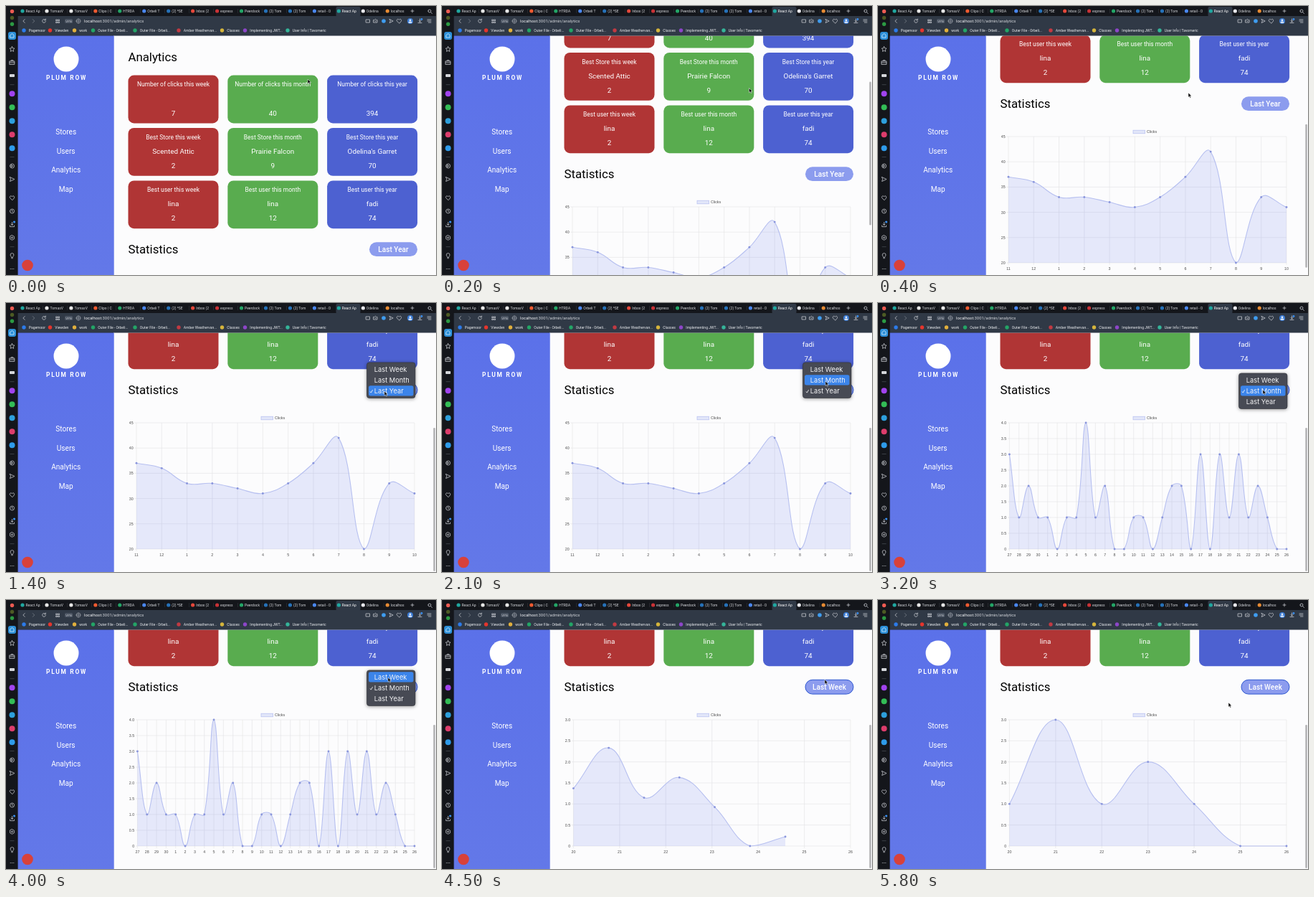
Recreate the animation shown at these times as an HTML page. Size 600 by 375 pixels, loop 5900 ms.

```html
<!DOCTYPE html>
<html lang="en">
<head>
<meta charset="utf-8">
<title>Analytics dashboard</title>
<style>
  html, body { margin: 0; width: 100%; height: 100%; overflow: hidden; background: #14161b; }
  #stage { display: block; width: 600px; height: 375px; font-family: Roboto, sans-serif; }
  text { white-space: pre; }
  .tick { font: 5.3px "Liberation Sans", sans-serif; fill: #4c4c4c; }
  .menu { font: 9.3px Inter, sans-serif; fill: #f4f4f6; }
  .icon { fill: none; stroke: #c3c6cc; stroke-width: .8; stroke-linecap: round; stroke-linejoin: round; }
  #popup { filter: drop-shadow(0 1px 2.5px rgba(0, 0, 0, .4)); }
</style>
</head>
<body>
<svg id="stage" viewBox="0 0 600 375">
  <defs>
    <linearGradient id="side" x2="0" y2="1">
      <stop stop-color="#5b71e9"/><stop offset="1" stop-color="#6378e8"/>
    </linearGradient>
    <clipPath id="page"><rect x="150" y="41.5" width="450" height="333.5"/></clipPath>
    <clipPath id="plot"><rect x="181" y="384" width="390" height="178"/></clipPath>
  </defs>
  <rect x="150" y="41" width="450" height="334" fill="#fcfcfd"/>
  <g clip-path="url(#page)">
    <g id="content">
      <g id="cards"></g>
      <g id="button">
        <rect id="pill" x="507" y="329.3" width="67" height="19.8" rx="9.9" fill="#8c9cee"/>
        <text id="choice" x="540.5" y="342.9" font-size="10.1" font-weight="500" fill="#fff" text-anchor="middle"></text>
      </g>
      <rect x="356" y="376.2" width="16.5" height="4.6" fill="#e2e6f9" stroke="#b4bdf0" stroke-width=".7"/>
      <text class="tick" x="375" y="380.4">Clicks</text>
      <g id="axes"></g>
      <g clip-path="url(#plot)">
        <path id="area" fill="#6075e8" fill-opacity=".15"/>
        <path id="line" fill="none" stroke="#b7c0f0" stroke-width="1.1"/>
      </g>
      <g id="dots" fill="#8995dc"></g>
    </g>
    <rect id="thumb" x="596.2" width="2.8" height="200" rx="1.4" fill="#b8b8ba"/>
  </g>
  <g id="chrome"></g>
  <g id="popup">
    <rect x="503.5" y="0" width="67.5" height="49.6" rx="3.5" fill="#474a54" stroke="#303136" stroke-width=".6"/>
    <rect id="hover" x="506" width="62.5" height="14.4" rx="2.5" fill="#3b84ea"/>
    <g id="options"></g>
    <path id="check" fill="none" stroke="#fff" stroke-width=".8" d="M508 .5l1.3 1.7 2.3-4"/>
  </g>
  <g id="cursor" stroke-width=".5">
    <path id="arrow" d="M0 0v6.2l1.5-1.3 1 2.3 1.1-.5-1-2.2h2z" fill="#000" stroke="#fff"/>
    <path id="hand" d="M-.7 3.6v-3a.7.7 0 0 1 1.4 0v2l2.6.6q.8.3.7 1.2l-.5 2.6h-3.4l-2.2-2.6q.2-1 1.4-.2z" fill="#fff" stroke="#000"/>
  </g>
</svg>
<script>
const $ = id => document.getElementById(id);

function add(parent, tag, attrs, content) {
  const el = document.createElementNS('http://www.w3.org/2000/svg', tag);
  for (const key in attrs) el.setAttribute(key, attrs[key]);
  if (content !== undefined) el.textContent = content;
  parent.appendChild(el);
  return el;
}

const rect = (p, x, y, width, height, fill, rx = 0) => add(p, 'rect', { x, y, width, height, fill, rx });
const dot = (p, cx, cy, r, fill) => add(p, 'circle', { cx, cy, r, fill });
const label = (p, x, y, size, fill, str, anchor = 'start') =>
  add(p, 'text', { x, y, 'font-size': size, fill, 'text-anchor': anchor }, str);
const icon = (p, x, y, d) => add(p, 'path', { class: 'icon', transform: `translate(${x} ${y})`, d });
const show = (id, on) => { $(id).style.display = on ? '' : 'none'; };

// ---- browser window ----
const RING = 'M-3 0a3 3 0 1 0 6 0a3 3 0 1 0-6 0';
const HEART = 'M0 3l-3-3c-1-2 1.5-4 3-1.6c1.5-2.4 4-.4 3 1.6z';

function drawTabs(g) {
  const tabs = [
    ['React Ap', '#20a7a0'], ['TomasV', '#e6e6e6'], ['TomasV', '#e6e6e6'], ['Clipo | C', '#ee5a30'],
    ['HTRDA', '#23a566'], ['Orbeli T', '#4a87ee'], ['(2) *SE', '#2671b8'], ['Inbox (2', '#e5483b'],
    ['express', '#c93236'], ['Peerdock', '#23a566'], ['(2) Tom', '#2671b8'], ['(2) Tom', '#2671b8'],
    ['retail - O', '#4a87ee'], ['React Ap', '#20a7a0'], ['Odelina', '#e8e8ec'], ['localhos', '#e78b33'],
  ];
  rect(g, 460.5, 1, 34, 14, '#303946', 2);
  tabs.forEach(([name, color], i) => {
    const x = 20 + i * 33.95;
    dot(g, x + 3, 7, 2.6, color);
    label(g, x + 7.5, 9, 5, i === 13 ? '#fff' : '#d6d8dc', name);
    if (i && i !== 13 && i !== 14) rect(g, x - 2.4, 4, .4, 6, '#41454d');
  });
  icon(g, 567, 7, 'M-2 0h4M0-2v4');
  icon(g, 591, 7, 'M-2 0a2 2 0 1 0 4 0a2 2 0 1 0-4 0M1.5 1.5l2 2');
}

function drawToolbar(g) {
  icon(g, 25, 21, 'M1.2-2.4l-2.4 2.4 2.4 2.4');
  icon(g, 38.5, 21, 'M-1.2-2.4l2.4 2.4-2.4 2.4').style.opacity = .5;
  icon(g, 53, 21, 'M2 -1.5a2.4 2.4 0 1 0 .4 2M2.3 -3v1.8h-1.8');
  icon(g, 72, 21, 'M-2-2h1.5v1.5h-1.5zM1-2h1.5v1.5h-1.5zM-2 1h1.5v1.5h-1.5zM1 1h1.5v1.5h-1.5z');
  rect(g, 82, 18, 11, 6, '#4b5462', 1.5);
  label(g, 87.5, 22.7, 4.2, '#c3c6cc', 'VPN', 'middle');
  icon(g, 101, 21, RING + 'M-3 0h6M0-3v6').style.strokeWidth = .5;
  const url = label(g, 109, 23, 5.9, '#f2f3f5', 'localhost');
  add(url, 'tspan', { fill: '#d2d5da' }, ':3001/admin/analytics');
  icon(g, 505, 21, 'M-2.5-2h5v4h-5z');
  icon(g, 515.5, 21, 'M-2.5-1.5h1l1-1h1l1 1h1v3.5h-5zM-.8 0h1.6');
  dot(g, 527, 21, 2.8, '#3f9df0');
  icon(g, 537.5, 21, 'M-2.3-2.5l5 2.5-5 2.5 1-2.5z');
  icon(g, 548.5, 21, HEART);
  dot(g, 564, 21, 4, '#3a7bd5');
  dot(g, 564, 20, 1.4, '#e4ecf6');
  rect(g, 561.5, 21.8, 5, 2, '#e4ecf6', 1);
  icon(g, 577.5, 21, 'M0-3v4m-1.6-1.5l1.6 1.6 1.6-1.6M-2.5 2.5h5');
  dot(g, 580, 18.5, 1.4, '#3c91f2');
  icon(g, 590.5, 21, 'M-2.5-2h5M-2.5 0h5M-1 2h3.5');
}

function drawBookmarks(g) {
  const marks = [
    [25, '#2c7bea', 'Pagemoor'], [61.5, '#e5352d', 'Viewden'], [95.5, '#e1b03c', 'work'],
    [121.5, '#23a566', 'Outer File - Orbeli...'], [180, '#23a566', 'Outer File - Orbeli...'],
    [241, '#c23a42', 'Amber Weathervan...'], [301.5, '#d6b53b', 'Classes'],
    [333.5, '#8d46c9', 'Implementing JWT...'], [393, '#35b59a', 'User Info | Tavomeric'],
  ];
  for (const [x, color, name] of marks) {
    dot(g, x, 34, 2.7, color);
    label(g, x + 6.8, 35.9, 5, '#eceef1', name);
  }
}

function drawRail(g) {
  dot(g, 8.5, 7.5, 2.7, '#ee5b52');
  dot(g, 8.5, 16.5, 2.7, '#4c5a24');
  dot(g, 8.5, 25.2, 2.7, '#2c9a43');
  rect(g, 3, 36, 11, 11, '#2c8fd8', 3);
  icon(g, 8.5, 41.5, 'M-2.5-1l2.5-2 2.5 2v3.5h-5z').style.stroke = '#d7efff';
  icon(g, 8.5, 60, 'M0-3.4l1 2.2 2.5.3-1.8 1.8.4 2.5-2.1-1.2-2.1 1.2.4-2.5-1.8-1.8 2.5-.3z');
  icon(g, 8.5, 78.5, 'M-3.3-1.6h6.6v4.6h-6.6zM-1.3-1.6v-1.4h2.6v1.4M-3.3.5h6.6');
  rect(g, 5, 95, 7, 4, '#d4d6da', 1);
  rect(g, 5.5, 109.5, 6, .6, '#555a63');
  ['#a143ef', '#33bd56', '#2d9fdc', '#dd3d6c', '#2e9bea'].forEach((c, i) => dot(g, 8.5, 122.3 + i * 19, 4, c));
  rect(g, 5.5, 210, 6, .6, '#555a63');
  icon(g, 8.5, 223, RING + 'M-1-1.4l2.3 1.4-2.3 1.4z');
  icon(g, 8.5, 241.5, 'M-3-3l6.4 3-6.4 3 1-3z');
  icon(g, 8.5, 267.5, HEART);
  icon(g, 8.5, 286, RING + 'M0-1.6v1.8l1 .8');
  icon(g, 8.5, 304.5, 'M0-3v4m-1.6-1.5l1.6 1.6 1.6-1.6M-3 1.5v1.7h6v-1.7');
  dot(g, 11.5, 301, 1.6, '#3c91f2');
  icon(g, 8.5, 323, 'M0-3.3l2.9 1.6v3.4l-2.9 1.6-2.9-1.6v-3.4zM-1 0a1 1 0 1 0 2 0a1 1 0 1 0-2 0');
  rect(g, 5.5, 335.5, 6, .6, '#555a63');
  icon(g, 8.5, 348.5, 'M-1 1.5c0-1-1.4-1.3-1.4-3a2.4 2.4 0 0 1 4.8 0c0 1.7-1.4 2-1.4 3zM-.8 3.2h1.6');
  [-2.2, 0, 2.2].forEach(dx => dot(g, 8.5 + dx, 366.5, .6, '#c3c6cc'));
}

function drawChrome() {
  const g = $('chrome');
  rect(g, 0, 0, 600, 14.5, '#14161b');
  rect(g, 0, 0, 16.6, 375, '#14161b');
  rect(g, 16.6, 14, 583.4, 27.5, '#303946');
  rect(g, 16.6, 41.5, 134.1, 333.5, 'url(#side)');
  drawTabs(g);
  drawToolbar(g);
  drawBookmarks(g);
  drawRail(g);
  dot(g, 84, 74, 17.5, '#fff');
  add(g, 'text', { x: 84.5, y: 103, 'font-size': 8.4, 'font-weight': 700, fill: '#fff',
    'text-anchor': 'middle', 'letter-spacing': 1.7 }, 'PLUM ROW');
  ['Stores', 'Users', 'Analytics', 'Map'].forEach((name, i) =>
    label(g, 83.7, 179 + i * 26.7, 10.1, '#fff', name, 'middle'));
  dot(g, 30, 361.5, 7.8, '#d8413a');
}

// ---- page content ----
function drawCards() {
  const g = $('cards');
  const columns = [
    ['week', '#b03535', 7, 'Scented Attic', 2, 'lina', 2],
    ['month', '#59ac4f', 40, 'Prairie Falcon', 9, 'lina', 12],
    ['year', '#4d61d1', 394, "Odelina's Garret", 70, 'fadi', 74],
  ];
  label(g, 170.5, 76.8, 16.8, '#000', 'Analytics');
  label(g, 170.5, 345, 16.8, '#000', 'Statistics');
  columns.forEach(([span, color, clicks, store, visits, user, score], i) => {
    const x = 170.5 + i * 138.8, mid = x + 63;
    const rows = [['Number of clicks', '', clicks], ['Best Store', store, visits], ['Best user', user, score]];
    rows.forEach(([title, name, value], j) => {
      const y = 96.6 + j * 73.4;
      rect(g, x, y, 126, 66.8, color, 8);
      label(g, mid, y + 15.6, 8.45, '#fff', `${title} this ${span}`, 'middle');
      label(g, mid, y + 35.6, 9.9, '#fff', name, 'middle');
      label(g, mid, y + 56, 9.9, '#fff', value, 'middle');
    });
  });
}

// ---- chart ----
const RIGHT = 570, TOP = 385, BASE = 561;
const count = (from, to) => Array.from({ length: to - from + 1 }, (_, i) => from + i);
// The left edge follows the width of the axis labels.
const VIEWS = {
  Year: { left: 182, min: 20, max: 45, step: 5, digits: 0,
    names: [11, 12, ...count(1, 10)],
    data: [37, 36, 33, 33, 32, 31, 33, 37, 42, 20, 33, 31] },
  Month: { left: 183.4, min: 0, max: 4, step: .5, digits: 1,
    names: [...count(27, 30), ...count(1, 26)],
    data: [...'312110114120011012203031312100'].map(Number) },
  Week: { left: 183.4, min: 0, max: 3, step: .5, digits: 1,
    names: count(20, 26), data: [1, 3, 1, 2, 1, 0, 0] },
};

const xOf = (view, i) => view.left + i * (RIGHT - view.left) / (view.data.length - 1);
const yOf = (view, v) => BASE - (v - view.min) / (view.max - view.min) * (BASE - TOP);

function drawAxes(view) {
  const g = $('axes');
  g.replaceChildren();
  const grid = d => add(g, 'path', { d, stroke: '#e3e3e5', 'stroke-width': .6 });
  for (let v = view.min; v <= view.max; v += view.step) {
    const y = yOf(view, v);
    grid(`M${view.left - 3} ${y}H${RIGHT}`);
    add(g, 'text', { class: 'tick', x: view.left - 4.3, y: y + 1.9, 'text-anchor': 'end' },
      v ? v.toFixed(view.digits) : '0');
  }
  view.names.forEach((name, i) => {
    const x = xOf(view, i);
    grid(`M${x} ${TOP}V${BASE + 3}`);
    add(g, 'text', { class: 'tick', x, y: 570.6, 'text-anchor': 'middle' }, name);
  });
}

// Points slide from the previous view; extra ones rise from the baseline.
function pointsAt(view, old, p) {
  const mix = (a, b) => a + (b - a) * p;
  return view.data.map((v, i) => {
    const from = i < old.data.length ? yOf(old, old.data[i]) : BASE;
    return [mix(xOf(old, i), xOf(view, i)), mix(from, yOf(view, v))];
  });
}

function curve(pts, tension = .4) {
  const cap = y => Math.min(BASE, Math.max(TOP, y));
  const handles = pts.map((c, i) => {
    const a = pts[i - 1] || c, b = pts[i + 1] || c;
    const before = Math.hypot(c[0] - a[0], c[1] - a[1]);
    const after = Math.hypot(b[0] - c[0], b[1] - c[1]);
    const k = tension / (before + after || 1);
    const at = s => [c[0] + s * k * (b[0] - a[0]), cap(c[1] + s * k * (b[1] - a[1]))];
    return { enter: at(-before), leave: at(after) };
  });
  return pts.map((c, i) => i ? `C${handles[i - 1].leave} ${handles[i].enter} ${c}` : `M${c}`).join('');
}

function drawChart(view, old, p) {
  const pts = pointsAt(view, old, p), d = curve(pts);
  $('line').setAttribute('d', d);
  $('area').setAttribute('d', `${d}V${BASE}H${pts[0][0]}Z`);
  $('dots').replaceChildren();
  for (const [x, y] of pts) if (x <= RIGHT + .5) dot($('dots'), x, y, 1.45);
}

// ---- timeline ----
const LOOP = 5900, FRAME = 100;
const SCROLL = [[0, 0], [100, 30], [200, 105], [300, 170], [400, 203], [500, 214], [600, 218]];
const POINTER = [
  [0, 421, 102], [100, 424, 108], [300, 433, 121], [600, 433, 121], [1200, 528, 123], [1500, 528, 123],
  [1900, 535, 109], [2200, 535, 109], [2500, 537, 121], [3300, 537, 121], [3800, 533, 108],
  [4200, 533, 108], [4500, 534, 111], [4800, 530, 116], [5300, 489, 143],
];
const CHANGES = [['Year', -2000], ['Month', 2297], ['Week', 4238]];
const POPUPS = [{ open: 1300, close: 2250, picked: 2 }, { open: 3000, close: 4200, picked: 1 }];
const OPTIONS = ['Week', 'Month', 'Year'];
const ROW = 15;

function track(keys, t) {
  const i = keys.findIndex(k => k[0] > t);
  if (i < 0) return keys.at(-1).slice(1);
  const a = keys[i - 1], b = keys[i], p = (t - a[0]) / (b[0] - a[0]);
  return a.slice(1).map((v, j) => v + (b[j + 1] - v) * p);
}

function placePopup(picked, y) {
  const top = 112.9 - picked * ROW;
  const row = Math.max(0, Math.min(2, Math.round((y - top - 10) / ROW)));
  $('popup').setAttribute('transform', `translate(0 ${top})`);
  $('hover').setAttribute('y', 2.3 + row * ROW);
  $('check').setAttribute('transform', `translate(0 ${10 + picked * ROW})`);
}

function placePointer(x, y, scroll, popup) {
  const overPill = !popup && x > 507 && x < 574 && Math.abs(y + scroll - 339.2) < 9.9;
  $('cursor').setAttribute('transform', `translate(${x} ${y})`);
  show('arrow', !overPill);
  show('hand', overPill);
}

let shownView;
function render(t) {
  const [scroll] = track(SCROLL, t), [x, y] = track(POINTER, t);
  $('content').setAttribute('transform', `translate(0 ${-scroll})`);
  $('thumb').setAttribute('y', 42 + scroll * .605);
  show('thumb', t > 0);

  const now = CHANGES.findLastIndex(c => c[1] <= t);
  const [name, start] = CHANGES[now];
  const view = VIEWS[name], old = VIEWS[CHANGES[Math.max(0, now - 1)][0]];
  const left = 1 - Math.min(1, (t - start) / 1000);
  if (name !== shownView) {
    drawAxes(view);
    $('choice').textContent = 'Last ' + name;
    shownView = name;
  }
  drawChart(view, old, 1 - left ** 4);

  const popup = POPUPS.find(m => t >= m.open && t < m.close);
  $('pill').setAttribute('stroke', t >= POPUPS[0].open ? '#2b55cf' : 'none');
  show('popup', popup);
  if (popup) placePopup(popup.picked, y);
  placePointer(x, y, scroll, popup);
}

drawChrome();
drawCards();
OPTIONS.forEach((name, i) => add($('options'), 'text', { class: 'menu', x: 513.8, y: 12.8 + i * ROW }, 'Last ' + name));

let origin, last;
function tick(now) {
  origin ??= now;
  const t = Math.floor((now - origin) % LOOP / FRAME) * FRAME;
  if (t !== last) render(last = t);
  requestAnimationFrame(tick);
}
render(0);
requestAnimationFrame(tick);
</script>
</body>
</html>
```
